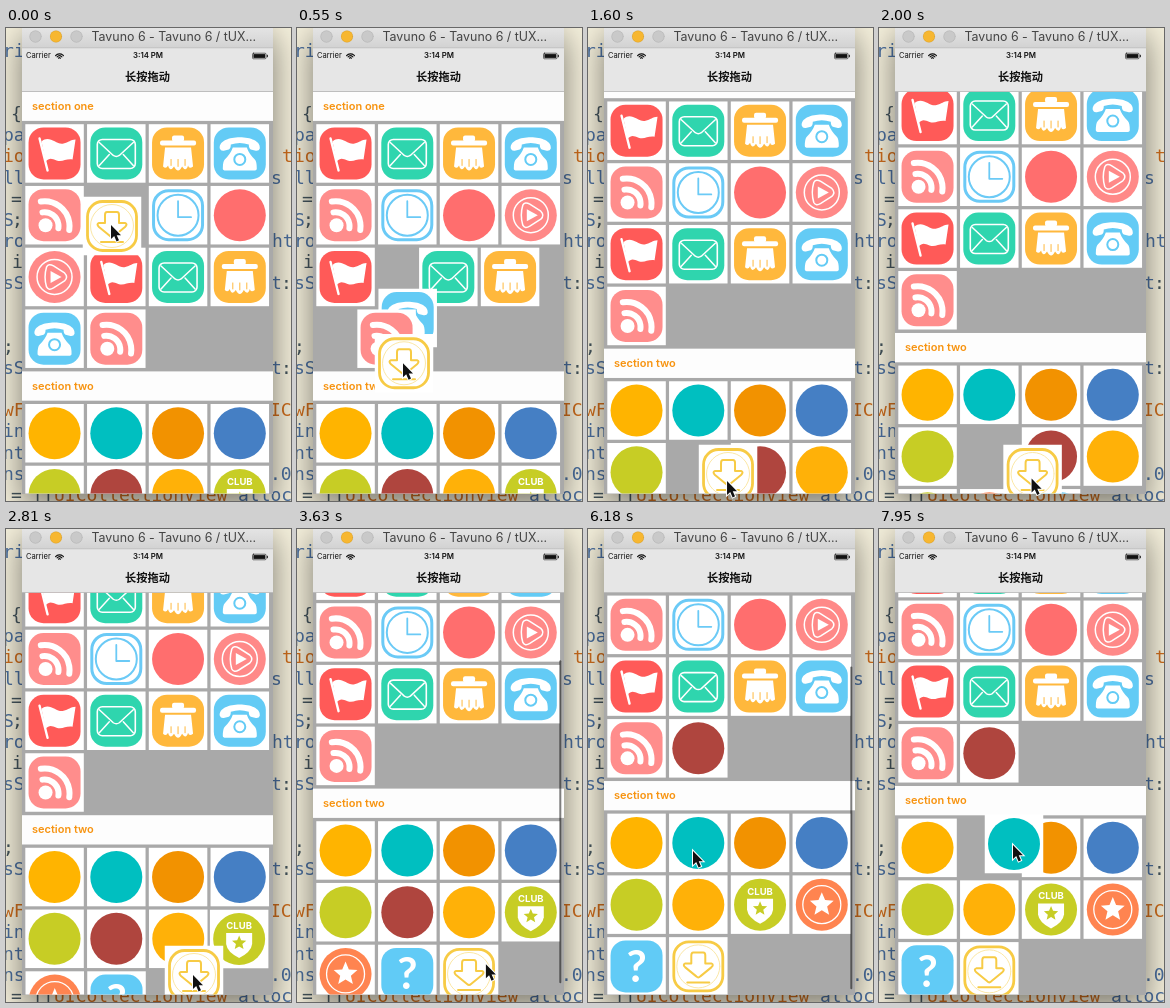
An HTML page with a canvas that plays this animation: 285x473 px, repeating every 8000 ms.

```html
<!DOCTYPE html>
<html lang="en">
<head>
<meta charset="utf-8">
<title>Drag between sections</title>
<style>
html, body { margin: 0; width: 100%; height: 100%; overflow: hidden; background: #f3eed9; }
canvas { display: block; width: 285px; height: 473px; }
</style>
</head>
<body>
<canvas id="stage"></canvas>
<script>
const W = 285, H = 473, LOOP = 8000;
const canvas = document.getElementById('stage');
const dpr = window.devicePixelRatio || 1;
canvas.width = W * dpr;
canvas.height = H * dpr;
const c = canvas.getContext('2d');

const SANS = 'Inter, Roboto, sans-serif';
const MONO = '"DejaVu Sans Mono", monospace';
const CJK = '"Noto Sans CJK SC", "Noto Sans CJK", sans-serif';
const SCREEN = { x: 16, y: 63.6, w: 251, h: 402 };
const CELL = 58.5, PITCH = 61.75, TOPS = [96.2, 376];

// ---- drawing helpers ----
function rect(x, y, w, h, color) {
  c.fillStyle = color;
  c.fillRect(x, y, w, h);
}
function round(x, y, w, h, r) {
  c.beginPath();
  c.roundRect(x, y, w, h, r);
}
function fillRound(x, y, w, h, r, color) {
  round(x, y, w, h, r);
  c.fillStyle = color;
  c.fill();
}
function strokeRound(x, y, w, h, r, color, width) {
  round(x, y, w, h, r);
  stroke(color, width);
}
function stroke(color, width) {
  c.strokeStyle = color;
  c.lineWidth = width;
  c.stroke();
}
function disc(x, y, r, color) {
  c.beginPath();
  c.arc(x, y, r, 0, Math.PI * 2);
  c.fillStyle = color;
  c.fill();
}
function ring(x, y, r, color, width) {
  c.beginPath();
  c.arc(x, y, r, 0, Math.PI * 2);
  stroke(color, width);
}
function fillPath(d, color) {
  c.fillStyle = color;
  c.fill(new Path2D(d));
}
function strokePath(d, color, width) {
  c.strokeStyle = color;
  c.lineWidth = width;
  c.stroke(new Path2D(d));
}
function text(s, x, y, font, color, align = 'left') {
  c.font = font;
  c.fillStyle = color;
  c.textAlign = align;
  c.textBaseline = 'middle';
  c.fillText(s, x, y);
}
function star(x, y, r, color) {
  c.beginPath();
  for (let i = 0; i < 10; i++) {
    const a = i * Math.PI / 5 - Math.PI / 2, q = i % 2 ? r * 0.45 : r;
    c.lineTo(x + q * Math.cos(a), y + q * Math.sin(a));
  }
  c.closePath();
  c.fillStyle = color;
  c.fill();
}
const tile = color => fillRound(-26, -26, 52, 52, 15, color);
const plain = color => () => disc(0, 0, 26, color);

// ---- icons, centred on 0,0 ----
const icons = {
  flag() {
    tile('#ff5a58');
    strokePath('M-15 -15L-7 17', '#fff', 2.4);
    fillPath('M-13 -12C-5 -19 2 -8 9 -10C14 -11 16 -14 21 -14L18 6C11 5 8 9 2 7C-3 5 -5 4 -9 8Z', '#fff');
  },
  mail() {
    tile('#2fd5ae');
    strokeRound(-19, -14, 38, 29, 5, '#fff', 1.6);
    strokePath('M-17 -11L-3 2Q0 4 3 2L17 -11M-17 12L-7 1M17 12L7 1', '#fff', 1.5);
  },
  trash() {
    tile('#ffb83c');
    fillRound(-18, -13, 36, 5, 2, '#fff');
    fillRound(-6, -18, 12, 6, 2, '#fff');
    fillPath('M-13 -6H13L15 13Q11 16 10 12Q8 19 4 13Q0 21 -4 13Q-8 19 -10 12Q-12 16 -15 13Z', '#fff');
    strokePath('M-7 6V12M0 6V13M7 6V12', '#ffb83c', 1);
  },
  phone() {
    tile('#63cbf5');
    fillPath('M-20 -5C-22 -20 22 -20 20 -5Q19 -2 15 -3L11 -4Q9 -5 9 -9Q0 -12 -9 -9Q-9 -5 -11 -4L-15 -3Q-19 -2 -20 -5Z', '#fff');
    fillPath('M-7 -6H7Q9 0 15 6Q17 8 17 15Q17 17 14 17H-14Q-17 17 -17 15Q-17 8 -15 6Q-9 0 -7 -6Z', '#fff');
    ring(0, 6, 5.5, '#63cbf5', 2);
  },
  rss() {
    tile('#ff8d8c');
    disc(-9, 10, 7, '#fff');
    for (const r of [14, 25]) {
      c.beginPath();
      c.arc(-10, 11, r, -Math.PI / 2 - 0.15, 0.15);
      stroke('#fff', 6);
    }
  },
  load() {
    const gold = '#f7cb45';
    strokeRound(-24.5, -24.5, 49, 49, 15, gold, 2.8);
    ring(0, 0, 21.5, '#fbe7a5', 1);
    strokePath('M-5 -14H5Q7 -14 7 -11V-3H13Q16 -2 13 1L2 10Q0 12 -2 10L-13 1Q-16 -2 -13 -3H-7V-11Q-7 -14 -5 -14ZM-11 16H11', gold, 2);
  },
  clock() {
    const blue = '#6bcaf6';
    strokeRound(-24.5, -24.5, 49, 49, 15, blue, 3);
    ring(0, 0, 20.5, blue, 2);
    strokePath('M0 -14V2H13', blue, 1.8);
  },
  chat: plain('#ff6e6e'),
  play() {
    disc(0, 0, 26, '#ff8988');
    ring(0, 0, 17.5, '#fff', 1.5);
    strokePath('M-8 -10Q-6 -14 -1 -11L10 -4Q14 0 10 4L-1 11Q-6 14 -8 10Q-11 0 -8 -10Z', '#fff', 1.5);
    fillPath('M-4 -6L7 0L-4 6Z', '#fff');
  },
  gold: plain('#ffb400'),
  teal: plain('#00bfc0'),
  orange: plain('#f29200'),
  blue: plain('#457fc4'),
  lime: plain('#c7cd25'),
  brick: plain('#af453e'),
  amber: plain('#ffb108'),
  club() {
    disc(0, 0, 26, '#c7cd25');
    text('CLUB', 0, -13, 'bold 9.5px ' + SANS, '#fff', 'center');
    fillPath('M-13 -6H13V5Q12 13 0 19Q-12 13 -13 5Z', '#fff');
    star(0, 4, 7.5, '#c7cd25');
  },
  star() {
    disc(0, 0, 26, '#ff8450');
    ring(0, 0, 19, '#fff', 1.3);
    star(0, 0, 12.5, '#fff');
  },
  help() {
    tile('#61cbf6');
    text('?', 0, 2, 'bold 44px Lato, sans-serif', '#fff', 'center');
  }
};

const items = ('flag mail trash phone rss load clock chat play flag mail trash phone rss ' +
  'gold teal orange blue lime brick amber club star help').split(' ');
const LOAD = 5, TEAL = 15, BRICK = 19;

// ---- timeline ----
// time, item, section, index
const moves = [
  [230, LOAD, 0, 9], [450, LOAD, 0, 13], [680, LOAD, 1, 1], [950, LOAD, 1, 5],
  [2000, LOAD, 1, 6], [2560, LOAD, 1, 10],
  [4940, BRICK, 1, 1], [5090, BRICK, 0, 9], [5290, BRICK, 0, 13]
];
// tracks hold time, x, y
const drags = [
  { id: LOAD, from: 0, drop: 2820, path: [[0, 106, 198], [60, 106, 198], [300, 106, 260], [550, 107, 335],
    [810, 110, 405], [900, 110, 407], [1130, 146, 442], [1600, 140, 446], [1900, 150, 446], [2520, 172, 446], [2810, 188, 446]] },
  { id: BRICK, from: 4780, drop: 5360, path: [[4780, 110, 372], [4840, 110, 363], [5050, 110, 285],
    [5180, 110, 145], [5240, 110, 145], [5360, 110, 216]] },
  { id: TEAL, from: 7780, drop: 9000, path: [[7780, 110, 319], [7950, 135, 315]] }
];
const pointer = [[0, 105, 197], [60, 105, 197], [300, 105, 260], [550, 106, 335], [810, 109, 405], [900, 109, 407],
  [1130, 139, 448], [1600, 139, 453], [1900, 149, 451], [2520, 171, 448], [2810, 187, 446], [3340, 187, 446],
  [3800, 190, 429], [4150, 190, 429], [4670, 137, 376], [4840, 137, 376], [5050, 137, 295], [5180, 130, 157],
  [5240, 126, 157], [5360, 120, 222], [5600, 78, 309], [5650, 78, 309], [5710, 79, 312], [6060, 79, 312],
  [6180, 105, 322], [6300, 105, 322], [6590, 105, 322], [6820, 105, 320], [7780, 105, 320], [7950, 134, 316]];
const scroll = [[1160, 0], [1600, 22.7], [2480, 57.2], [3340, 57.2], [3560, 80], [3850, 95.5],
  [6060, 95.5], [6180, 91.4], [6300, 86.4]];
const barAlpha = [[3340, 0], [3400, 1], [3860, 1], [4090, 0], [6060, 0], [6120, 1], [6590, 1], [6820, 0]];

function track(points, t) {
  if (t <= points[0][0]) return points[0].slice(1);
  for (let i = 1; i < points.length; i++) {
    const a = points[i - 1], b = points[i];
    if (t < b[0]) {
      const k = (t - a[0]) / (b[0] - a[0]);
      return a.slice(1).map((v, j) => v + (b[j + 1] - v) * k);
    }
  }
  return points[points.length - 1].slice(1);
}
function ease(k) {
  k = Math.max(0, Math.min(1, k));
  return k * k * (3 - 2 * k);
}
const mix = (a, b, k) => a.map((v, i) => v + (b[i] - v) * k);

// Slot centres per item for a pair of sections.
function layout(sections) {
  const spots = [];
  sections.forEach((list, s) => list.forEach((id, i) => {
    spots[id] = [19.3 + CELL / 2 + (i % 4) * PITCH, TOPS[s] + CELL / 2 + Math.floor(i / 4) * PITCH];
  }));
  return spots;
}
let sections = [[], []];
items.forEach((_, id) => sections[id < 14 ? 0 : 1].push(id));
const layouts = [{ time: -1000, spots: layout(sections) }];
for (const [time, id, s, index] of moves) {
  sections = sections.map(list => list.filter(v => v !== id));
  sections[s].splice(index, 0, id);
  layouts.push({ time, spots: layout(sections) });
}
function place(id, t) {
  let p = layouts[0].spots[id];
  for (const { time, spots } of layouts) {
    if (t > time) p = mix(p, spots[id], ease((t - time) / 260));
  }
  return p;
}

// ---- scene ----
const BLUE = '#4b6f9f', RUST = '#cf6d1c', INK = '#44545c';
const line = i => 24 + 21.15 * i;
const code = [
  [0, -3, 'ri', BLUE], [3, 5, '{', INK], [4, -3, 'pa', BLUE], [5, -3, 'io', RUST], [6, -3, 'll', BLUE],
  [7, 5, '=', INK], [8, -3, 'S', BLUE], [8, 6, ';', INK], [9, -3, 'ro', BLUE], [10, 6, 'i', INK],
  [11, -3, 'sS', BLUE], [14, -3, ';', INK], [15, -3, 'sS', BLUE], [17, -3, 'wF', RUST], [18, -3, 'in', BLUE],
  [19, -3, 'nt', BLUE], [20, -3, 'ns', BLUE], [5, 276, 't', RUST], [6, 265, 's', BLUE], [9, 266, 'ht', BLUE],
  [11, 265, 't', BLUE], [11, 275, ':', INK], [15, 265, 't', BLUE], [15, 275, ':', INK], [17, 264, 'IC', RUST],
  [20, 264, '.0', BLUE], [21, 5, '= [[', INK], [21, 48, 'UICollectionView', RUST], [21, 232, 'alloc', BLUE]
];

function desktop() {
  rect(0, 0, W, H, '#f5f0dc');
  c.save();
  for (const [row, x, s, color] of code) text(s, x, line(row), '18px ' + MONO, color);
  c.shadowColor = 'rgba(0,0,0,.5)';
  c.shadowBlur = 32 * dpr;
  c.shadowOffsetY = 12 * dpr;
  rect(16, -4, 251, 470, '#aaa');
  c.restore();
}

function chrome() {
  const g = c.createLinearGradient(0, 0, 0, 20);
  g.addColorStop(0, '#e4e4e4');
  g.addColorStop(1, '#d2d2d2');
  rect(16, 0, 251, 20, g);
  [['#c9c9c9', 29.5], ['#f7b731', 50], ['#c9c9c9', 70.5]].forEach(([color, x]) => {
    disc(x, 8.5, 6, color);
    ring(x, 8.5, 5.8, 'rgba(0,0,0,.12)', 0.6);
  });
  text('Tavuno 6 - Tavuno 6 / tUX...', 85.5, 9.5, '12.4px ' + SANS, '#454545');

  rect(16, 20, 251, 43.6, '#e6e6e6');
  rect(16, 19.6, 251, 0.6, '#b5b5b5');
  text('Carrier', 20, 28, '7.6px ' + SANS, '#111');
  for (const r of [1.2, 3.2, 5.2]) {
    c.beginPath();
    c.arc(53.5, 31, r, -Math.PI * 0.77, -Math.PI * 0.23);
    stroke('#111', 1.2);
  }
  text('3:14 PM', 142, 28, '600 7.8px ' + SANS, '#111', 'center');
  strokeRound(246.5, 25.2, 13.5, 5.6, 1, '#111', 0.6);
  rect(247.4, 26.1, 11.7, 3.8, '#111');
  rect(260.8, 26.8, 1, 2.4, '#111');
  text('长按拖动', 141.5, 49, 'bold 11.2px ' + CJK, '#111', 'center');
  rect(16, 63, 251, 0.6, '#b0b0b0');
}

function header(title, y) {
  rect(16, y, 251, 29.3, '#fdfdfd');
  text(title, 26, y + 14.8, '600 11px ' + SANS, '#f7930f');
}

function cell(id, [x, y]) {
  c.save();
  c.translate(x, y);
  rect(-CELL / 2, -CELL / 2, CELL, CELL, '#fff');
  icons[items[id]]();
  c.restore();
}

function arrow([x, y]) {
  c.save();
  c.translate(x, y);
  c.lineJoin = 'miter';
  const d = 'M0 0V14L3.2 11L5.6 16.4L8 15.3L5.7 10.2H10Z';
  strokePath(d, '#fff', 2);
  fillPath(d, '#111');
  c.restore();
}

function draw(t) {
  c.setTransform(dpr, 0, 0, dpr, 0, 0);
  c.lineCap = c.lineJoin = 'round';
  desktop();

  const [offset] = track(scroll, t);
  const spot = id => {
    const [x, y] = place(id, t);
    return [x, y - offset];
  };
  c.save();
  c.beginPath();
  c.rect(SCREEN.x, SCREEN.y, SCREEN.w, SCREEN.h);
  c.clip();
  rect(SCREEN.x, SCREEN.y, SCREEN.w, SCREEN.h, '#a9a9a9');
  header('section one', 63.6 - offset);
  header('section two', 343.4 - offset);

  const held = drags.find(d => t >= d.from && t < d.drop + 230);
  items.forEach((_, id) => {
    if (!held || held.id !== id) cell(id, spot(id));
  });
  if (held) cell(held.id, mix(track(held.path, t), spot(held.id), ease((t - held.drop) / 220)));

  const [alpha] = track(barAlpha, t);
  if (alpha > 0) {
    const view = SCREEN.h, total = view + 95.5;
    fillRound(262.3, SCREEN.y + offset * view / total, 2, view * view / total - 2, 1, `rgba(0,0,0,${0.5 * alpha})`);
  }
  c.restore();

  chrome();
  arrow(track(pointer, t));
}

function frame(now) {
  draw(now % LOOP);
  requestAnimationFrame(frame);
}
draw(0);
requestAnimationFrame(frame);
</script>
</body>
</html>
```
